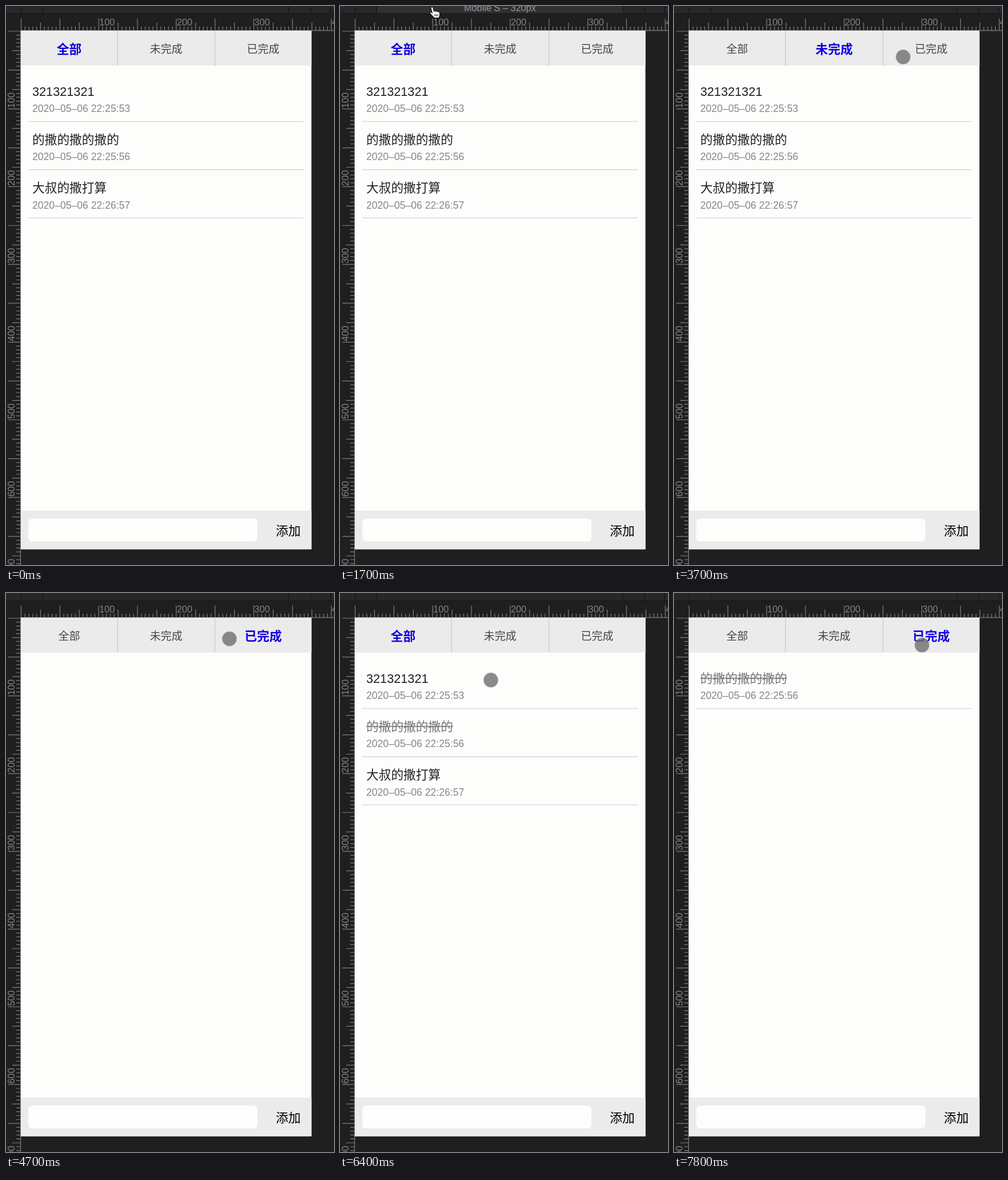
An HTML page for the animation above (8000 ms loop, 574 by 976 pixels).

```html
<!DOCTYPE html>
<html lang="zh">
<head>
<meta charset="utf-8">
<title>待办</title>
<style>
html, body { margin: 0; width: 100%; height: 100%; overflow: hidden; background: #1f1f20; }
svg { display: block; width: 574px; height: 976px; overflow: hidden;
  font-family: "Liberation Sans", "Noto Sans CJK SC", "Noto Sans CJK", sans-serif; }

.label { font-size: 16.3px; fill: #858585; }
.tick { stroke: #808080; stroke-width: 1.2; fill: none; }
.tab { font-size: 19px; fill: #444; text-anchor: middle; }
.tab.on { font-size: 21.7px; font-weight: 700; fill: #1000e0; }
.title { font-size: 21.7px; fill: #222; }
.title.done { fill: #777; }
.date { font-size: 17.6px; fill: #87878b; }
.add { font-size: 21.7px; text-anchor: middle; }

/* every animation shares the 8 s loop: 1.25% = 100 ms */
.views, .cursor, .hover, .hand, .dot { animation: 8s infinite; }
.views, .hover, .hand, .dot { animation-timing-function: step-end; }
.views { animation-name: views; }
.cursor { animation-name: move; animation-timing-function: ease-in-out; }
.hover { animation-name: hover; }
.hand { animation-name: hand; }
.dot { animation-name: dot; }

@keyframes views {
  0%, 70% { transform: translateX(0); }
  37.5% { transform: translateX(-574px); }
  50% { transform: translateX(-1148px); }
  76.25% { transform: translateX(-1722px); }
  86.25% { transform: translateX(-2296px); }
  95%, 100% { transform: translateX(-2870px); }
}
@keyframes move {
  0%, 21.25% { transform: translate(161px, 2px); }
  31.25% { transform: translate(230px, 65px); }
  35%, 37.5% { transform: translate(268px, 74px); }
  41.25%, 42.5% { transform: translate(260px, 72px); }
  46.25%, 50% { transform: translate(401px, 89px); }
  55%, 58.75% { transform: translate(391px, 80px); }
  68.75%, 70% { transform: translate(115px, 78px); }
  75%, 76.25% { transform: translate(250px, 236px); }
  80% { transform: translate(264px, 152px); }
  85%, 91.25% { transform: translate(285px, 80px); }
  95%, 100% { transform: translate(434px, 91px); }
}
@keyframes hover {
  0%, 23.75%, 100% { opacity: 0; }
  12.5% { opacity: 1; }
}
@keyframes hand {
  0%, 27.5%, 100% { opacity: 0; }
  12.5% { opacity: 1; }
}
@keyframes dot {
  0% { opacity: 0; }
  27.5%, 100% { opacity: 1; }
}
</style>
</head>
<body>
<svg viewBox="0 0 574 976">
  <rect width="574" height="976" fill="#1f1f20"/>
  <rect width="574" height="13" fill="#272728"/>
  <path d="M27 0V13M64 0V13M495 0V13M533 0V13M568 0V13M0 13.5H574" stroke="#19191a" stroke-width="1.5"/>
  <g class="hover">
    <rect x="65" width="430" height="12.5" fill="#303031"/>
    <text class="label" x="217" y="8.5" style="fill:#9a9a9d">Mobile S – 320px</text>
  </g>

  <g id="ruler"></g>

  <rect x="26" y="43" width="508.5" height="905.5" fill="#fdfdfb"/>
  <rect x="26" y="43" width="508.5" height="61" fill="#ebebeb"/>
  <path d="M195 43V104M365.7 43V104" stroke="#d7d7d0" stroke-width="2"/>
  <rect x="26" y="881" width="508.5" height="67.5" fill="#ebebeb"/>
  <rect x="39" y="895" width="401" height="40" rx="7" fill="#fdfdfb"/>
  <text class="add" x="494" y="924">添加</text>

  <g class="views" id="views"></g>

  <g class="cursor">
    <g class="hand">
      <path d="M-2 1.5C-2-.8 1.6-.8 2 1.5L3.6 7.5C4.2 5.8 6.6 6 7 7.8C7.8 6.5 9.8 6.8 10.2 8.4C11.4 7.4 13 8.2 13.2 9.8L13.6 13.5C13.6 15.5 12.6 16.5 12.3 18.8H3.6C2.2 16.5-.8 14-3 11.4C-4.6 9.4-2.4 8-.8 9.4L.4 10.4Z"
        fill="#fff" stroke="#111" stroke-width="1.1" stroke-linejoin="round"/>
      <path d="M5.2 12.2V16M7.7 12.2V16M10.2 12.2V16" stroke="#111"/>
    </g>
    <circle class="dot" r="12.7" fill="#6e6e6e" fill-opacity=".8" stroke="#b4b4b4" stroke-opacity=".7"/>
  </g>
</svg>
<script>
const UNIT = 1.357;   // stage pixels per ruler unit
const ROW = 84.15;

const $ = id => document.getElementById(id);
const tabs = ['全部', '未完成', '已完成'];
const items = [
  ['321321321', '2020–05–06 22:25:53'],
  ['的撒的撒的撒的', '2020–05–06 22:25:56'],
  ['大叔的撒打算', '2020–05–06 22:26:57'],
];
// active tab, visible items, finished item
const views = [
  [0, [0, 1, 2]],
  [1, [0, 1, 2]],
  [2, []],
  [0, [0, 1, 2], 1],
  [1, [0, 2], 1],
  [2, [1], 1],
];

function ruler() {
  let path = 'M25.5 43V976M25 42.8H574', labels = '';
  for (let n = 0; n <= 705; n += 5) {
    const x = 26.5 + n * UNIT, y = 44 + n * UNIT;
    const size = n % 50 === 0 ? 21 : n % 25 === 0 ? 14 : 7;
    path += `M${x} ${43 - size}V43M${25 - size} ${y}H25`;
    if (n && n % 100 === 0) {
      labels += `<text class="label" x="${x + 1}" y="34">${n}</text>
        <text class="label" text-anchor="end" transform="translate(14.5 ${y - 29}) rotate(-90)">${n}</text>`
        .replace(`${y - 29}`, `${y - 1.5}`).replace('text-anchor="end"', 'text-anchor="start"');
    }
  }
  return `<path class="tick" d="${path}"/>${labels}`;
}

function row(id, i, done) {
  const [title, date] = items[id];
  const y = i * ROW;
  const strike = done
    ? `<path d="M46 ${y + 148.8}h${title.length * 21.7}" stroke="#777" stroke-width="1.5"/>` : '';
  return `<text class="title${done ? ' done' : ''}" x="46" y="${y + 156.5}">${title}</text>${strike}
    <text class="date" x="46" y="${y + 185.2}">${date}</text>
    <path d="M39 ${y + 201.6}H521" stroke="#d5d5d9" stroke-width="1.4"/>`;
}

function view([active, ids, done], i) {
  const head = tabs.map((name, t) => {
    const on = t === active;
    return `<text class="tab${on ? ' on' : ''}" x="${110.5 + t * 169.8}" y="${on ? 83 : 82}">${name}</text>`;
  });
  const rows = ids.map((id, k) => row(id, k, id === done));
  return `<g transform="translate(${i * 574})">${head.join('')}${rows.join('')}</g>`;
}

$('ruler').innerHTML = ruler();
$('views').innerHTML = views.map(view).join('');
</script>
</body>
</html>
```
